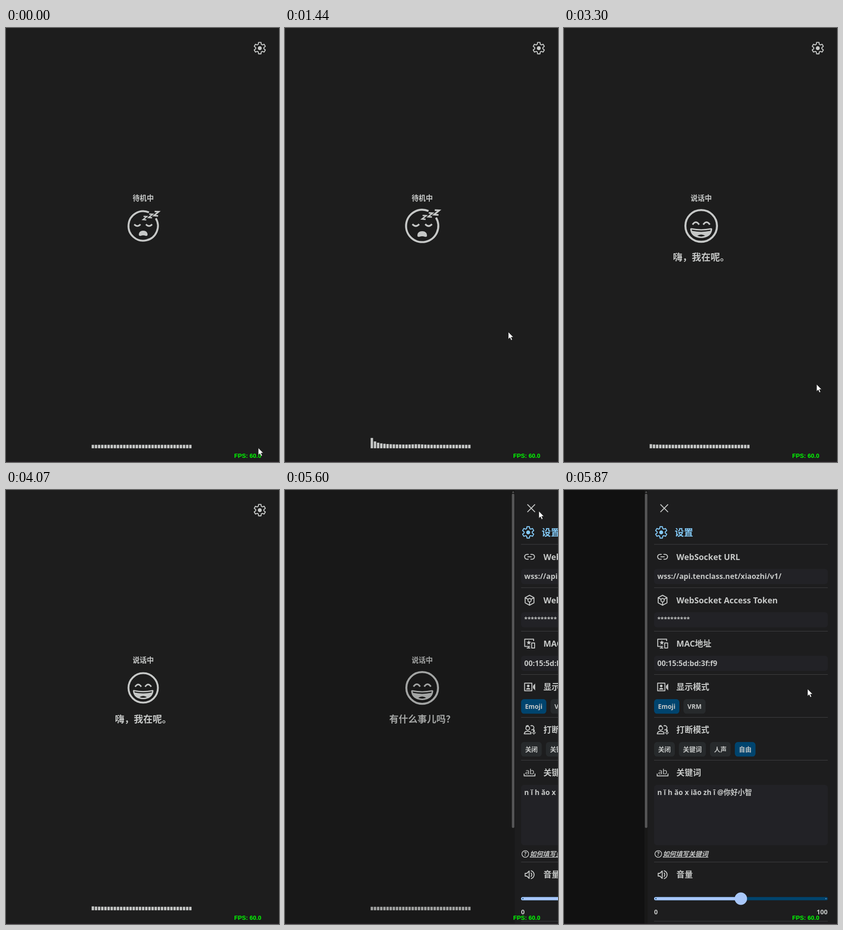
An HTML page for the animation above (5940 ms loop, 594x942 px).

```html
<!DOCTYPE html>
<html lang="zh-CN">
<head>
<meta charset="utf-8">
<title>Voice assistant</title>
<style>
  html, body { margin: 0; width: 100%; height: 100%; overflow: hidden; background: #1d1d1d; }
  svg { display: block; width: 100%; height: 100%; }
  text { font-family: "Noto Sans", "Noto Sans CJK SC", "Noto Sans CJK", sans-serif; font-weight: 600; fill: #c6c8c7; white-space: pre; }
  .cjk { font-family: "Noto Sans CJK SC", "Noto Sans CJK", "Noto Sans", sans-serif; }
  .fps { font: bold 13.1px "Liberation Sans", Arial, sans-serif; fill: #0f0; }
  .line { fill: none; stroke: #c6c8c7; stroke-width: 2; stroke-linejoin: round; }
  .thick { stroke-width: 4; }
  .eyes { stroke-width: 3.3; }
  .solid { fill: #c6c8c7; }
</style>
</head>
<body>
<svg viewBox="0 0 594 942" preserveAspectRatio="none">
  <defs>
    <g id="gear">
      <path id="gearEdge" fill="none" stroke="currentColor" stroke-width="2.1" stroke-linejoin="round"/>
      <circle r="4.3" fill="currentColor"/>
    </g>
  </defs>
  <rect width="594" height="942" fill="#1d1d1d"/>
  <use href="#gear" x="552.2" y="43.7" color="#c6c8c7"/>
  <text id="state" class="cjk" x="298.5" y="374.5" font-size="15.4" text-anchor="middle"></text>
  <g id="face">
    <g id="sleepy">
      <path id="openRing" class="line thick"/>
      <path class="line eyes" d="M-19.4 -3.5Q-12.7 4 -6 -3.5M6 -3.5Q12.7 4 19.4 -3.5"/>
      <path class="solid" d="M-9.5 19C-9.5 13 -5 10.5 0 10.5S9.5 13 9.5 19C9.5 22 7 22 5 21.3Q0 19.6 -5 21.3C-7 22 -9.5 22 -9.5 19Z"/>
      <g id="zs" class="line" style="stroke-linejoin:miter"></g>
    </g>
    <g id="happy">
      <circle class="line thick" r="32"/>
      <path class="line eyes" d="M-17.5 -2.6Q-10.8 -12.4 -4.2 -2.6M4.2 -2.6Q10.8 -12.4 17.5 -2.6"/>
      <path class="solid" d="M-22.3 6.5Q-22.3 4 -19.5 4.6Q0 8.6 19.5 4.6Q22.3 4 22.3 6.5C21.5 18.5 12 24.4 0 24.4S-21.5 18.5 -22.3 6.5Z"/>
      <path fill="#1d1d1d" d="M-19.2 7.4Q0 11.2 19.2 7.4L18.4 10Q0 14 -18.4 10ZM-8 19.8Q0 14.8 8 19.8Q0 23.2 -8 19.8Z"/>
    </g>
  </g>
  <text id="reply" class="cjk" y="505" font-size="20.5"></text>
  <g id="bars" class="solid"></g>
  <rect id="scrim" width="594" height="942"/>
  <g id="panel">
    <rect x="175" width="440" height="942" fill="#1d1d1e"/>
    <rect x="175" width="7" height="942" fill="#181818"/>
    <path d="M176.3 6L178.8 2.5L181.3 6Z" fill="#5c5c5c"/>
    <rect x="176" y="8" width="5.4" height="725.5" rx="2.7" fill="#555556"/>
    <path class="line" d="M209.8 31.3L226.4 47.9M226.4 31.3L209.8 47.9"/>
    <use href="#gear" x="211.5" y="92" color="#83c9f6"/>
    <g id="rows"></g>
    <g transform="translate(214.5 0)">
      <path class="line" d="M-2 139.8H-5.6A5.2 5.2 0 0 0 -5.6 150.2H-2M2 139.8H5.6A5.2 5.2 0 0 1 5.6 150.2H2M-4.5 145H4.5"/>
      <path class="line" d="M0 228.5L9.6 233.6V244.8L0 250.2L-9.6 244.8V233.6ZM-9.6 233.6L-3 237.3M9.6 233.6L3 237.3M0 242.8V250"/>
      <circle class="line" cy="239.2" r="3.6"/>
      <path class="line" d="M1 339.6H-10.6V323.8H8.8V328M-6 343H1.5M-2.3 339.6V343M4.6 332H11V343H4.6Z"/>
      <path id="star" class="solid" transform="translate(-1.6 331.4)"/>
      <path class="line" d="M-10.8 419.2H5V435.8H-10.8Z"/>
      <path class="solid" d="M7.4 425.3L12.2 420V435L7.4 429.7ZM-7.6 433Q-7 429.4 -2.9 429.4T1.8 433Z"/>
      <circle class="solid" cx="-2.9" cy="425.3" r="2.8"/>
      <circle class="line" cx="-4" cy="517" r="4.1"/>
      <path class="line" d="M2.4 512.2A4.6 4.6 0 1 1 3.6 520.4M-11.6 529.2Q-10.8 523.6 -4 523.6Q0 523.6 3 526V529.2ZM-8 513.6Q-6 510.4 -2 511.8"/>
      <path class="line" style="stroke-width:1.4" d="M6 525.4Q6 528.4 9.4 528.4T12.8 525.4M9.4 528.4V531"/>
      <rect class="solid" x="7.8" y="519.6" width="3.4" height="7" rx="1.7"/>
      <path class="line" d="M-11.8 615.5V620.5H11.8V615.5"/>
      <path class="line" d="M-9.6 832H-6L-.8 827V843L-6 838H-9.6ZM3 830.6Q6.6 835 3 839.4M2.8 826.2A9 9 0 0 1 2.8 843.8"/>
    </g>
    <text x="204.8" y="617" font-size="17" style="font-weight:400">ab</text>
    <circle class="line" cx="205.2" cy="790" r="7.3" style="stroke-width:1.6"/>
    <text x="205.2" y="794.4" font-size="12" text-anchor="middle">?</text>
    <path d="M215 797H314" stroke="#c6c8c7" stroke-width="1.3"/>
    <rect x="196" y="883.5" width="378" height="7" rx="3.5" fill="#00446e"/>
    <rect x="196" y="883.5" width="189" height="7" rx="3.5" fill="#a8c7fa"/>
    <circle cx="200" cy="887" r="1.3" fill="#00446e"/>
    <circle cx="570" cy="887" r="1.3" fill="#a8c7fa" opacity=".6"/>
    <circle cx="384.8" cy="887" r="13.5" fill="#a8c7fa"/>
  </g>
  <text class="fps" x="496.6" y="933">FPS: 60.0</text>
  <rect y="941" width="594" height="1" fill="#2a2028"/>
  <path id="cursor" d="M0 0V15.2L3.5 11.9L6 17.7L8.5 16.6L6 11H10.8Z" fill="#fff" stroke="#111" stroke-width=".6"/>
</svg>
<script>
const LOOP = 5940;
const $ = id => document.getElementById(id);
const show = (id, on) => { $(id).style.display = on ? '' : 'none'; };

function add(parent, tag, attrs, text) {
  const el = document.createElementNS('http://www.w3.org/2000/svg', tag);
  for (const k in attrs) el.setAttribute(k, attrs[k]);
  if (text) el.textContent = text;
  parent.append(el);
  return el;
}
function polar(r, deg) {
  const a = deg * Math.PI / 180;
  return `${(r * Math.cos(a)).toFixed(2)} ${(r * Math.sin(a)).toFixed(2)}`;
}
const polygon = points => 'M' + points.join('L') + 'Z';

// Gear, star and the open ring of the sleeping face
const teeth = [], star = [];
for (let a = -90; a < 270; a += 60) {
  teeth.push(polar(8.9, a - 22), polar(12.7, a - 12), polar(12.7, a + 12), polar(8.9, a + 22));
}
for (let k = 0; k < 10; k++) star.push(polar(k % 2 ? 2.3 : 5.4, k * 36 - 90));
$('gearEdge').setAttribute('d', polygon(teeth));
$('star').setAttribute('d', polygon(star));
$('openRing').setAttribute('d', `M${polar(32, -31)}A32 32 0 1 1 ${polar(32, -67)}`);
for (let i = 0; i < 3; i++) {
  add($('zs'), 'path', {
    d: 'M-3.3 -3.5L4 -4.2L-3.4 3.9L3.9 3.4',
    transform: `translate(${3.5 + 12.4 * i} ${-16.9 - 4.8 * i}) rotate(8) scale(${0.97 + 0.06 * i * i})`,
    'stroke-width': 2.7
  });
}

// Settings panel
const rows = $('rows');
const cjk = { class: 'cjk' };
const box = (x, y, w, h, fill) => add(rows, 'rect', { x, y, width: w, height: h, rx: 6.5, fill });
const label = (x, y, size, text, more) => add(rows, 'text', { x, y, 'font-size': size, ...more }, text);
const rule = y => add(rows, 'path', { d: `M196 ${y}H574`, stroke: '#414143' });
function section(y, title, more) {
  rule(y);
  return label(244.6, y + 33.8, 17.9, title, more);
}
function field(y, text, size = 16.1, drop = 75.2) {
  box(196, y + 53.2, 378, 33, '#222226');
  label(203, y + drop, size, text);
}
function chips(y, names, chosen, width, more) {
  let x = 196;
  for (const name of names) {
    const w = width(name);
    box(x, y + 53.5, w, 31.6, name === chosen ? '#00446e' : '#272a2c');
    label(x + w / 2, y + 74.5, 13.7, name, { 'text-anchor': 'middle', ...more });
    x += w + 9;
  }
}
label(241, 99.8, 20, '设置', { class: 'cjk', style: 'fill:#83c9f6' });
section(118, 'WebSocket URL');
field(118, 'wss://api.tenclass.net/xiaozhi/v1/');
section(212, 'WebSocket Access Token');
field(212, '**********', 13, 72.6);
add(section(306.5, 'MAC'), 'tspan', cjk, '地址');
field(306.5, '00:15:5d:bd:3f:f9');
section(400.5, '显示模式', cjk);
chips(400.5, ['Emoji', 'VRM'], 'Emoji', s => 37.5 + 3.5 * s.length);
section(493.5, '打断模式', cjk);
chips(493.5, ['关闭', '关键词', '人声', '自由'], '自由', s => 17.6 + 13.7 * s.length, cjk);
section(586.5, '关键词', cjk);
box(196, 640, 378, 131, '#222226');
add(label(203, 661.8, 15.4, 'n ǐ h ǎo x iǎo zh ī @'), 'tspan', cjk, '你好小智');
label(215, 795, 14.1, '如何填写关键词', { class: 'cjk', 'font-style': 'italic' });
section(807.5, '音量', cjk);
label(196, 921, 14, '0');
label(573.5, 921, 14, '100', { 'text-anchor': 'end' });
rule(936);

const bars = Array.from({ length: 32 }, (_, i) =>
  add($('bars'), 'rect', { x: 186.4 + i * 6.84, width: 5.2 }));

// Breathing face: [start, duration] of each breath
const breaths = [[520, 1830], [2890, 1200], [4180, 2200]];
function faceScale(t) {
  const breath = breaths.find(([from, span]) => t > from && t < from + span);
  return breath ? 1 + .048 * (1 - Math.cos(2 * Math.PI * (t - breath[0]) / breath[1])) : 1;
}

// One spoken phrase over a faint murmur
function loudness(t) {
  const quiet = t > 4700 || (t > 2490 && t < 2890);
  const murmur = quiet ? 0 : .12 * Math.sin(Math.PI * t / 1245) ** 2;
  return murmur + Math.exp(-(((t - 1440) / 200) ** 2));
}
const spectrum = i => 14.5 * Math.exp(-i / 9) / (1 + .8 * i) + Math.exp(-((i - 14.5) ** 2) / 5);

// Pointer moves: [start, end, x, y]
const moves = [[60, 590, 486, 660], [1300, 1430, 486, 660], [1450, 1800, 480, 576], [2890, 3440, 552, 780],
  [3500, 3860, 562, 943], [4150, 4150, 567, 640], [4150, 5000, 552.4, 46], [5640, 5870, 530, 432]];
function pointer(t) {
  let x = 549, y = 911.5;
  for (const [from, to, toX, toY] of moves) {
    if (t < from) break;
    const p = t >= to ? 1 : 1 - (1 - (t - from) / (to - from)) ** 2.5;
    x += (toX - x) * p;
    y += (toY - y) * p;
  }
  return [x, y];
}

// Critically damped spring that settles by the end of the loop
function slide(t) {
  const s = Math.max(0, t - 5561) / 1000, w = Math.sqrt(500);
  return Math.min(1, (1 - (1 + (w - 1) * s) * Math.exp(-w * s)) / .992);
}

function draw(t) {
  const talking = t >= 2140;
  const reply = t >= 4400 ? '有什么事儿吗？' : talking ? '嗨，我在呢。' : '';
  $('state').textContent = t < 1790 ? '待机中' : talking ? '说话中' : '聆听中';
  $('reply').textContent = reply;
  $('reply').setAttribute('x', 298.5 - reply.length * 10.25);
  show('sleepy', !talking);
  show('happy', talking);
  $('face').setAttribute('transform', `translate(298.5 429.6) scale(${faceScale(t)})`);

  const amp = loudness(t);
  bars.forEach((bar, i) => {
    const h = 7.5 + amp * spectrum(i);
    bar.setAttribute('y', 912.2 - h);
    bar.setAttribute('height', h);
  });

  const open = slide(t);
  $('scrim').setAttribute('opacity', .42 * open ** .6);
  $('panel').setAttribute('transform', `translate(${420 * (1 - open)} 0)`);
  show('panel', open > 0);
  $('cursor').setAttribute('transform', `translate(${pointer(t)})`);
}

const start = performance.now();
function tick() {
  draw((performance.now() - start) % LOOP);
  requestAnimationFrame(tick);
}
draw(0);
requestAnimationFrame(tick);
</script>
</body>
</html>
```
